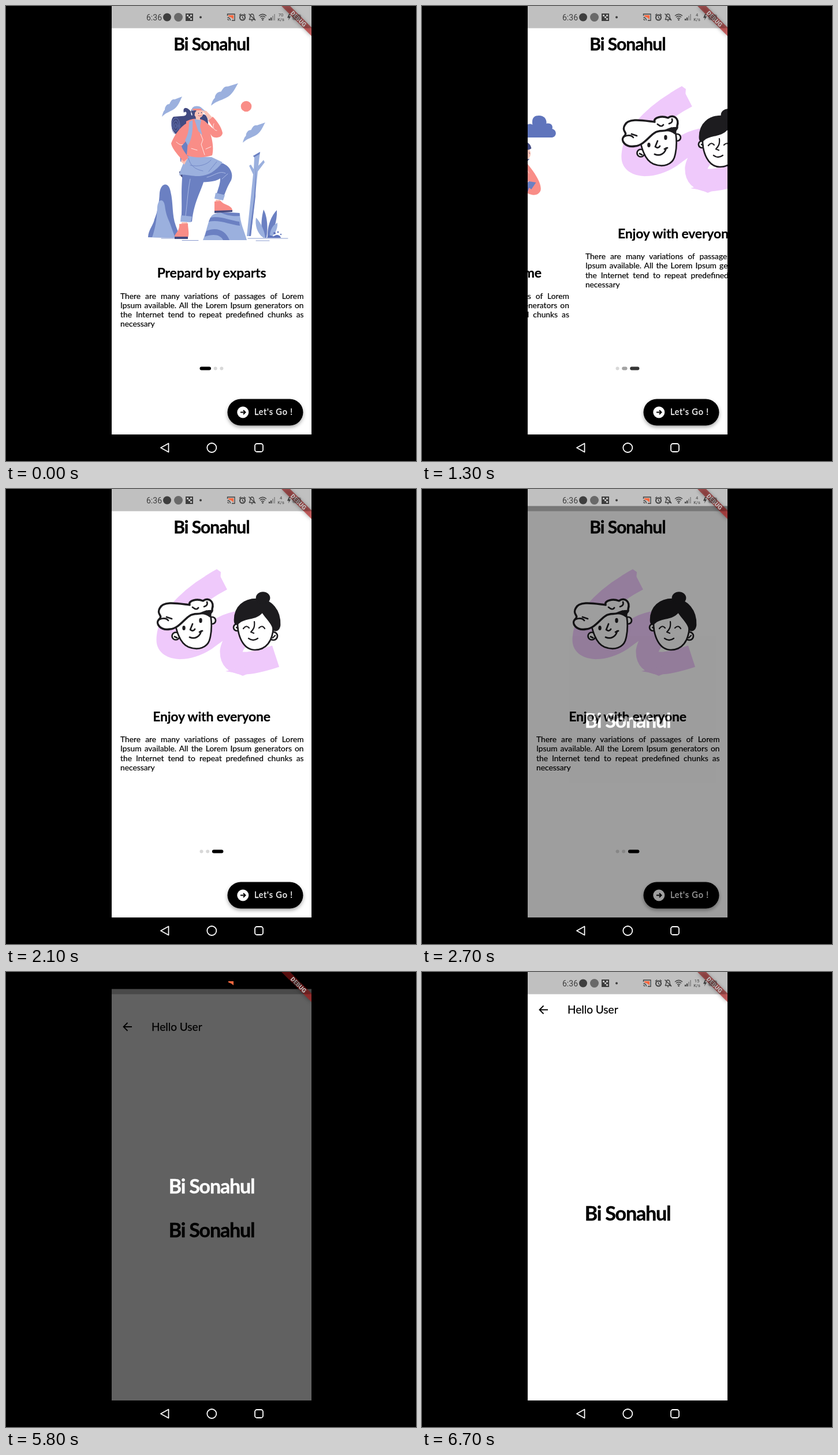
These frames come from a looping animation (710x789 px, 6.8 s). An HTML page:

```html
<!DOCTYPE html>
<html lang="en">
<head>
<meta charset="utf-8">
<title>Onboarding</title>
<style>
  html, body { margin: 0; width: 100%; height: 100%; overflow: hidden; background: #000; }
  svg { display: block; width: 710px; height: 789px; }
  text, .body { font-family: Lato, Inter, sans-serif; }
  .brand, .head { font-weight: 700; text-anchor: middle; }
  .head { font-size: 23px; letter-spacing: -.2px; }
  .brand { font-size: 34px; letter-spacing: -1.2px; stroke-width: .4; }
  .body { font-size: 13.8px; line-height: 16.3px; color: #000; -webkit-text-stroke: .2px #000; }
  .body div { white-space: nowrap; text-align-last: justify; }
  .body div:last-child { text-align-last: left; }
  .sys, .debug { font-family: Roboto, sans-serif; }
  .c { fill: #f98d87 } .b { fill: #6b80c2 } .l { fill: #9bb0de } .n { fill: #424a80 }
  .k { fill: #fbc3b6 } .d { fill: #5f74bc } .ink { fill: #1d1c1f }
  .line { fill: none; stroke-width: .8; stroke-linecap: round; }
  .pen { stroke: #1d1c1f; stroke-width: 2.7; stroke-linecap: round; stroke-linejoin: round; fill: #fff; }
  .pen .open { fill: none; }
</style>
</head>
<body>
<svg viewBox="0 0 710 789">
  <defs>
    <clipPath id="screen"><path d="M183 0H529V743H183Z"/></clipPath>
    <path id="wisp" d="M0 35C8 27 11 28 19 23 28 18 31 8 35 0L22 5C17 4 15 9 13 13 8 13 5 18 5 23 2 26 1 31 0 35Z"/>
    <path id="puff" d="M6 38C-3 36-2 24 9 24 8 16 17 12 22 16 20 4 25 0 33 0 43 0 47 7 46 14 54 12 58 18 56 23 65 25 64 37 56 38Z"/>
  </defs>

  <g clip-path="url(#screen)">
    <rect x="183" width="346" height="743" fill="#fff"/>
    <text class="brand" x="356" y="76.500" style="font-size:30px;letter-spacing:-1px" stroke="#000">Bi Sonahul</text>

    <g class="page" id="hiker">
      <use href="#wisp" class="l" x="270" y="157"/>
      <use href="#wisp" class="l" transform="translate(355 134) scale(1.34 1.11)"/>
      <use href="#wisp" class="l" transform="translate(410 202) scale(1.11 1)"/>
      <circle class="c" cx="416" cy="174" r="9.3"/>
      <path class="b" d="M246 401C247 387 254 383 257 370 263 355 265 343 266 324 268 306 282 304 285 322 290 342 287 362 294 381L302 402Z"/>
      <path class="l" d="M253 401C258 387 261 373 262 349 263 334 273 333 275 346 277 361 279 365 284 377L293 402Z"/>
      <path class="line" stroke="#6b80c2" d="M269 403H306M305 406.500H333M419 403H488M433 407H456"/>
      <path class="l" d="M417 399 428 292 421 277 424 275 429 283 430 263 428 260 440 253 437 277 446 267 448 271 436 287 424 399Z"/>
      <path class="b" d="M428 260 440 253 439 257 430 262ZM433 276 430 330 421 399 424 399 432 330Z"/>
      <path class="b" d="M448 402C440 389 442 369 446 353 453 365 454 389 451 402ZM453 402C452 381 460 363 469 354 470 375 462 391 457 402Z"/>
      <path class="l" d="M446 402C434 394 431 379 433 367 441 375 448 390 449 402ZM457 402C456 388 463 379 470 376 471 388 464 397 459 402Z"/>
      <path class="d" d="M452 402C455 393 461 401 464 399 470 395 475 398 476 402Z"/>
      <g class="d"><circle cx="465" cy="394" r="2"/><circle cx="471" cy="392" r="1.5"/><circle cx="476" cy="396" r="1.2"/></g>

      <path class="l" d="M341 406C347 392 349 377 354 367 359 358 367 360 376 357L405 359C405 375 413 391 417 406Z"/>
      <path class="b" d="M354 367C369 363 389 372 404 374L405 381C387 379 370 370 351 374ZM347 390C367 382 381 391 387 406H376C372 397 360 394 344 400ZM372 358 404 359 405 364C392 365 380 363 372 358Z"/>
      <path class="n" d="M290 192 343 188Q350 190 350 205L345 235 299 224C286 222 283 198 290 192ZM300 287 375 273C369 294 353 303 333 303 314 303 301 300 300 287Z"/>
      <g class="line" stroke="#6b80c2"><ellipse cx="294" cy="208" rx="7" ry="14"/><ellipse cx="294" cy="208" rx="4.500" ry="9"/><ellipse cx="294" cy="208" rx="2" ry="4"/></g>
      <path class="b" d="M300 238 316 225 318 265 302 270ZM306 288 346 291C340 320 326 335 322 374L303 373C306 347 302 326 306 288ZM329 293C348 292 359 271 376 273 389 279 394 291 390 302 384 312 381 320 378 328L365 325C368 315 371 308 371 299 361 306 344 305 329 306Z"/>
      <path class="line" stroke="#b9c8ec" d="M319 300C314 325 314 345 310 370M348 297C361 294 369 285 380 290M374 300 384 291"/>
      <path class="l" d="M303 363 322 365 320 375 302 374ZM363 324 379 328 376 337 361 334ZM311 260 356 262 375 271C363 287 350 294 335 295 321 296 307 290 300 294 302 281 309 272 311 260Z"/>
      <path class="line" stroke="#6b80c2" d="M316 264C319 276 326 283 341 286M355 267C349 275 333 280 319 276M365 270 351 287"/>
      <path class="k" d="M304 375H314V381H304ZM363 336H371V343H363ZM304 263 314 265 309 275 303 270Z"/>
      <path class="c" d="M300 378 315 377C315 386 318 394 315 402H292C291 394 301 392 300 378ZM361 339 372 338C376 345 391 345 392 354L391 357 361 358Z"/>
      <path class="n" d="M292 400H315V404H292ZM361 355 392 354V357L361 359Z"/>
      <path class="c" d="M312 200C322 194 340 193 348 203L352 216C358 231 360 248 357 259 341 264 325 263 313 259 314 246 316 235 312 225Z"/>
      <path class="c" d="M313 203C300 211 291 225 286 238 287 247 299 260 308 270L316 263C311 255 306 250 304 243 309 237 316 231 318 221ZM341 205 357 226C364 231 375 227 375 220 373 210 366 200 358 192L350 198C354 205 358 209 359 213L348 203Z"/>
      <path class="k" d="M340 181 347 182 357 193 351 198 345 188ZM328 190H336V199L330 202Z"/>
      <path class="k" d="M325 181 341 180C343 187 340 194 334 194 328 194 324 188 325 181Z"/>
      <path class="n" d="M323 194C317 182 322 174 332 174L329 183C326 184 328 188 325 194ZM322 186C315 174 305 174 308 185 313 180 315 189 308 191 315 199 319 191 323 191Z"/>
      <path class="l" d="M322 182C320 174 331 171 338 176L346 183C339 180 332 180 322 182ZM317 201 323 198C324 215 322 231 315 242L310 233C316 222 317 212 317 201ZM326 196 338 198 336 209 340 224 333 217Z"/>
      <path class="c" d="M323 178 338 178 339 181 324 181Z"/>
      <path class="n" d="M333 185h1v2h-1ZM338 184h1v2h-1Z"/>
      <path class="line" stroke="#fff" d="M337 222 341 232 338 240 344 258M295 236C300 240 303 242 306 240M360 204C357 209 360 216 365 216M321 247 331 250M346 248 355 244"/>
      <path class="line" stroke="#c54f60" d="M333 190Q337 192 339 189"/>
    </g>

    <g class="page" id="chute">
      <use href="#puff" class="d" x="430" y="190"/>
      <use href="#puff" class="d" transform="translate(218 261) scale(.57 .63)"/>
      <path class="c" d="M277 153Q290 139 306 135L377 168 423 171Q417 202 401 217L281 228Z"/>
      <path class="n" d="M306 135C345 122 392 131 423 171Q400 166 377 168C355 153 334 142 306 135ZM281 228 295 209 319 266Q292 273 260 272Z"/>
      <path class="b" d="M260 272C247 237 247 188 277 153 271 185 276 211 281 228ZM295 209C313 187 338 174 361 171 377 183 391 202 401 217 386 239 354 260 319 266Z"/>
      <path class="line" stroke="#e89a98" d="M260 272 355 315M281 228 362 289M372 181 392 260M419 178 423 235"/>
      <path class="k" d="M263 309 271 306 279 319 271 325ZM286 311 292 307 299 319 290 322Z"/>
      <path class="n" d="M240 300C239 294 247 295 254 297L269 300C272 304 268 310 265 313 257 308 242 307 240 300ZM268 296C271 292 276 295 282 298L294 308C293 313 290 316 285 314 279 309 267 304 268 296Z"/>
      <path class="b" d="M286 325 300 320 318 352C334 352 343 339 352 330L402 356C396 373 378 377 365 381 347 393 332 396 314 394 299 376 283 347 268 326L279 317Z"/>
      <path class="n" d="M307 382 327 383 318 394ZM382 359 404 358 410 363C402 368 396 378 388 377L378 371Z"/>
      <path class="l" d="M265 325 279 316 284 324 271 332ZM285 325 298 318 301 327 290 333Z"/>
      <path class="line" stroke="#c3d0f0" d="M297 338C310 359 324 364 340 359 355 355 364 346 371 347M319 380C337 380 359 372 379 362"/>
      <path class="c" d="M383 265C397 258 411 258 420 265L438 267C452 284 469 306 466 320 461 332 446 328 438 321L407 362C383 356 358 340 343 325L360 315C343 306 344 289 354 281Z"/>
      <path d="M363 288 373 292 367 302Z" fill="#fff"/>
      <path class="k" d="M422 262 427 251 440 266 428 280Z"/>
      <path class="b" d="M411 267 420 262 429 272 434 266 437 282 425 279 420 287Z"/>
      <path class="k" d="M421 243C428 236 444 244 448 252 451 262 443 269 435 267 427 264 421 255 421 243Z"/>
      <path class="n" d="M424 260C414 253 410 244 414 239 422 241 425 238 427 231 435 237 447 232 450 247 445 251 439 250 436 247 430 245 429 251 428 256ZM435 267 447 265 443 269Z"/>
      <path class="line" stroke="#424a80" d="M436 253 440 254M446 254 447 256M436 261Q439 265 443 262"/>
      <path class="d" d="M392 281 449 306 431 362 372 337Z"/>
      <path class="n" d="M372 337 384 344 396 349 391 352 371 342ZM431 362 439 340 434 362Z"/>
      <path class="l" d="M388 283 397 286 393 299 389 294ZM404 305 414 309 410 320 399 316Z"/>
      <path class="line" style="stroke-width:2.5" stroke="#9bb0de" d="M421 344 432 348M418 350 429 354"/>
      <path class="line" stroke="#a9b8e8" d="M392 281 449 306M387 306 382 322"/>
      <path class="k" d="M363 316 378 326 389 334 388 342 379 340 362 327ZM448 304 436 303 422 291 412 292 423 302 443 313ZM420 296 411 298 425 306 443 311Z"/>
      <path class="b" d="M358 309 371 316 366 326 355 316ZM446 304 458 306 450 318 439 310Z"/>
      <path class="line" stroke="#ffd2cc" d="M362 292C374 289 384 281 388 273M355 329C373 342 388 349 403 351M441 281 446 290"/>
    </g>

    <g class="page" id="faces">
      <path fill="none" stroke="#efc9fb" stroke-width="39" d="M374 157C331 179 281 220 280 260 279 282 318 279 344 262 367 246 383 228 421 231 431 240 394 255 390 281 389 309 418 306 467 290"/>
      <path fill="#efc9fb" d="M345 151 356 144 365 139 372 144 371 158ZM380 316 398 319 410 324 422 319 426 304Z"/>
      <g class="pen">
        <circle cx="357" cy="228" r="6"/><circle cx="294" cy="255" r="6.500"/>
        <path d="M293 234C297 254 304 269 316 274 334 281 348 274 352 263 357 248 357 226 352 211L318 210Z"/>
        <path style="stroke-width:3.5" d="M266 207C272 193 300 199 318 201 315 193 331 190 341 194 351 187 361 195 357 208 358 215 351 217 347 212 337 220 326 213 318 220 309 225 299 242 284 243 267 246 258 233 265 226 273 219 260 218 266 207Z"/>
        <path class="open" d="M266 226Q276 222 281 228M323 205Q330 211 333 206M343 204Q350 202 348 196M278 222 287 225M323 234 319 244Q324 248 327 243M318 257C327 261 336 256 338 246M335 248 340 246M292 256 296 258"/>
        <path class="ink" d="M336 216Q345 211 356 211L353 221Q346 215 336 216Z"/>
        <g class="ink" stroke="none"><ellipse cx="308" cy="241" rx="2.700" ry="4"/><ellipse cx="337" cy="228" rx="2.700" ry="4.200"/></g>

        <circle cx="400" cy="240" r="6"/><circle cx="463" cy="255" r="7"/>
        <path d="M401 228C400 255 411 279 431 279 450 279 462 264 463 239L444 211Z"/>
        <path class="ink" d="M396 227C396 204 412 191 434 191 461 191 475 212 474 236 473 244 468 247 463 244 462 232 451 225 444 213 433 227 413 222 403 232 399 236 396 235 396 227Z"/>
        <ellipse class="ink" cx="445" cy="189" rx="11" ry="9.500"/>
        <path class="open" style="stroke-width:2.2" d="M411 242Q416 235 421 241M438 241Q444 235 448 242M430 230C431 239 429 243 424 248L429 250M420 259Q428 265 436 259M399 240 402 242M462 258 466 254"/>
      </g>
    </g>

    <g id="dots"></g>

    <g>
      <rect x="383.500" y="681.500" width="131" height="46" rx="23" style="filter:drop-shadow(0 3px 3px rgba(0,0,0,.35))"/>
      <circle cx="410.300" cy="704.500" r="10" fill="#fff"/>
      <path d="M406 704.500H414.500M411 701 414.500 704.500 411 708" fill="none" stroke="#000" stroke-width="1.900"/>
      <text x="430" y="709" fill="#fff" stroke="#fff" stroke-width=".3" font-size="14.500" letter-spacing=".8">Let's Go !</text>
    </g>

    <g id="splash">
      <rect x="183" width="346" height="789"/>
      <text class="brand" x="356" y="384" fill="#fff" stroke="#fff">Bi Sonahul</text>
    </g>

    <g id="home">
      <rect x="183" width="346" height="789" fill="#fff"/>
      <path d="M218 65.500H204M210.500 58.500 203.500 65.500 210.500 72.500" fill="none" stroke="#000" stroke-width="1.800"/>
      <text x="252" y="72" font-size="19" stroke="#000" stroke-width=".25">Hello User</text>
      <text class="brand" x="356" y="430.500" stroke="#000">Bi Sonahul</text>
    </g>

    <g style="filter:drop-shadow(0 1px 3px rgba(0,0,0,.5))">
      <path d="M477 0H492L529 37V52Z" fill="#b71c1c" fill-opacity=".63"/>
    </g>
    <text class="debug" transform="translate(504 25) rotate(45)" text-anchor="middle" font-size="10.500" font-weight="900" fill="#fff">DEBUG</text>

    <!-- Status bar scrim stays put while screens move beneath it -->
    <rect x="183" width="346" height="38.500" fill-opacity=".247"/>
    <g class="sys" fill-opacity=".68" stroke-opacity=".68">
      <text class="sys" x="243" y="24.500" font-size="14">6:36</text>
      <circle cx="279" cy="19.500" r="7"/>
      <circle cx="298.500" cy="19.500" r="7.500" fill-opacity=".45"/>
      <path fill-rule="evenodd" d="M311 13h13v13h-13ZM313 15v3h3v-3ZM319 15v3h3v-3ZM316 18v3h3v-3ZM319 21v3h3v-3Z"/>
      <circle cx="337" cy="19.500" r="2"/>
      <path d="M385 16H394V23Q390 19 385 18Z" fill="#f9683f" fill-opacity="1"/>
      <g fill="none" stroke="#000" stroke-width="1.300">
        <path d="M383.500 17V14H396V25H391M383.500 20Q388 20 388.500 25M383.500 23Q385 23 385.500 25"/>
        <circle cx="409.500" cy="20" r="4.500" stroke-width="2"/><path d="M409.500 17.500V20.500L412 22M404 16 407 13.500M415 16 412 13.500"/>
        <path d="M421 23.500H431Q429 21 429 18 429 14 426 14 423 14 423 18 423 21 421 23.500M425 25.500H427M420.500 13.500 432 25"/>
        <path d="M438 17Q444.500 11.500 451 17M440 19.500Q444.500 15.500 449 19.500M442 22Q444.500 20 447 22"/>
      </g>
      <circle cx="444.500" cy="24" r="1.300"/>
      <path d="M455 22h2v3h-2ZM458 20h2v5h-2Z"/><path d="M461 17h2v8h-2ZM464 14h2v11h-2Z" fill-opacity=".25"/>
      <text class="sys" id="rate" x="476" y="18" font-size="7.500" text-anchor="middle"></text>
      <text class="sys" x="476" y="26" font-size="7.500" text-anchor="middle">K/s</text>
      <path d="M490 14 487 20.500H490L489 25 493 18H490L492 14Z"/>
      <rect x="496" y="14.500" width="15" height="10" rx="3" fill-opacity=".3"/>
    </g>
  </g>

  <g fill="none" stroke="#fff" stroke-width="1.800" stroke-linejoin="round">
    <path d="M268 766 281.500 758.500V773.500Z"/>
    <circle cx="356.300" cy="766" r="8"/>
    <rect x="431" y="759" width="14" height="14" rx="3.500"/>
  </g>
</svg>

<script>
const LOOP = 6800, STEP = 100, PAGE = 345.5, RISE = 186;
const $ = id => document.getElementById(id);
const clamp = v => Math.max(0, Math.min(1, v));

const lines = [
  'There are many variations of passages of Lorem',
  'Ipsum available. All the Lorem Ipsum generators on',
  'the Internet tend to repeat predefined chunks as',
  'necessary'
];
const pages = [...document.querySelectorAll('.page')];
const titles = ['Prepard by exparts', 'Delivery to your home', 'Enjoy with everyone'];

pages.forEach((page, i) => {
  const lift = i === 2 ? 68.5 : 0;
  page.insertAdjacentHTML('beforeend',
    `<text class="head" x="356" y="${471 - lift}" stroke="#000" stroke-width=".2">${titles[i]}</text>
     <foreignObject x="198" y="${494.5 - lift}" width="317.5" height="70">
       <div xmlns="http://www.w3.org/1999/xhtml" class="body">${lines.map(s => `<div>${s}</div>`).join('')}</div>
     </foreignObject>`);
});

$('dots').innerHTML = pages.map(() => '<rect y="625.5" height="6" rx="3"/>').join('');
const dots = [...$('dots').children];

function bezier(x1, y1, x2, y2) {
  const at = (a, b, s) => 3 * a * s * (1 - s) ** 2 + 3 * b * s * s * (1 - s) + s ** 3;
  return x => {
    let lo = 0, hi = 1;
    for (let i = 0; i < 24; i++) {
      const mid = (lo + hi) / 2;
      if (at(x1, x2, mid) < x) lo = mid; else hi = mid;
    }
    return at(y1, y2, lo);
  };
}
const slide = bezier(.4, 0, .2, 1);
const fade = bezier(.42, 0, 1, 1);

// Short drag, then a spring that settles exponentially.
function scrollAt(t) {
  const rest = (gap, from) => gap * .37 ** ((t - from) / 100);
  if (t < 200) return 0;
  if (t < 300) return 5;
  if (t < 1200) return PAGE - rest(13, 300);
  if (t < 1300) return PAGE + 25;
  return 2 * PAGE - rest(4.3, 1600);
}

function enter(el, t, start) {
  const p = clamp((t - start) / 300);
  el.setAttribute('opacity', fade(p));
  el.setAttribute('transform', `translate(0 ${RISE * (1 - slide(p))})`);
  el.style.display = p > 0 ? '' : 'none';
}

function draw(t) {
  const scroll = scrollAt(t);
  pages.forEach((page, i) => page.setAttribute('transform', `translate(${i * PAGE - scroll} 0)`));

  let x = 335.5;
  dots.forEach((dot, i) => {
    const on = clamp(1 - Math.abs(i - scroll / PAGE));
    const width = 6 + 13.5 * on, grey = 216 * (1 - on);
    dot.setAttribute('x', x);
    dot.setAttribute('width', width);
    dot.setAttribute('fill', `rgb(${grey},${grey},${grey})`);
    x += width + 4.7;
  });

  enter($('splash'), t, 2532);
  enter($('home'), t, 5632);
  $('rate').textContent = t < 300 ? '70' : t < 6200 ? '4' : t < 6400 ? '11' : '15';
}

const begin = performance.now();
function tick() {
  const t = (performance.now() - begin) % LOOP;
  draw(Math.floor(t / STEP) * STEP);
  requestAnimationFrame(tick);
}
tick();
</script>
</body>
</html>
```
